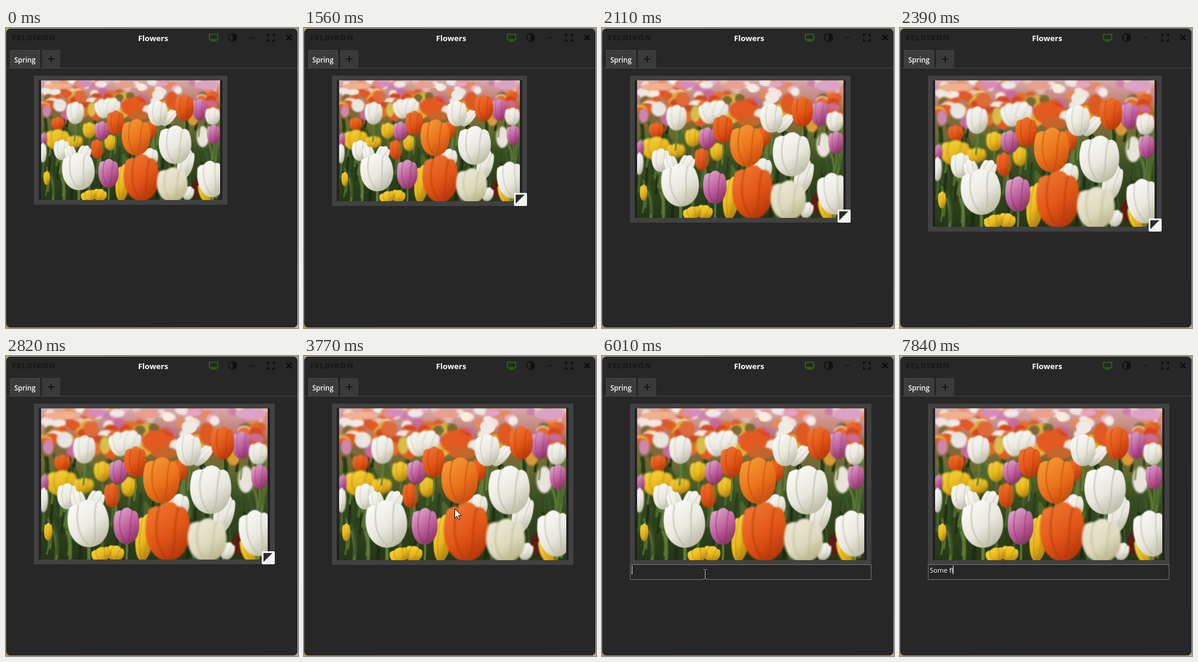
Recreate the animation shown at these times as an HTML page with a canvas. Size 491x504 px, loop 7.99 s.

```html
<!DOCTYPE html>
<html lang="en">
<head>
<meta charset="utf-8">
<title>Flowers</title>
<style>
html, body { margin: 0; width: 100%; height: 100%; overflow: hidden; background: #272727; }
canvas { display: block; }
</style>
</head>
<body>
<canvas id="stage" width="491" height="504"></canvas>
<script>
const LOOP = 7990;
const FONT = '"Open Sans", "Noto Sans", sans-serif';
const ctx = document.getElementById('stage').getContext('2d');

// Photo: painted once in a 382 x 255 space
const PW = 382, PH = 255;
const photo = paintPhoto();

function seeded(seed) {
  return () => (seed = (seed * 16807) % 2147483647) / 2147483647;
}

function paintPhoto() {
  const cv = document.createElement('canvas');
  cv.width = PW * 2;
  cv.height = PH * 2;
  const g = cv.getContext('2d');
  g.scale(2, 2);
  const rnd = seeded(41);
  const pick = list => list[Math.floor(rnd() * list.length)];

  const bg = g.createLinearGradient(0, 0, 0, PH);
  [[0, '#d9a9ab'], [.12, '#c58a80'], [.24, '#94683f'], [.4, '#666a30'], [.6, '#374d20'], [1, '#263617']]
    .forEach(([p, c]) => bg.addColorStop(p, c));
  g.fillStyle = bg;
  g.fillRect(0, 0, PW, PH);

  function blob(x, y, w, h, c) {
    g.fillStyle = c;
    g.beginPath();
    g.ellipse(x, y, w / 2, h / 2, 0, 0, 7);
    g.fill();
  }

  // leaves
  g.filter = 'blur(2px)';
  g.lineCap = 'round';
  for (let i = 0; i < 110; i++) {
    const x = rnd() * PW, y = 100 + rnd() * 160;
    g.strokeStyle = pick(['#1c2a13', '#38562a', '#4a672c', '#263f1a', '#5f7a3a']);
    g.lineWidth = 3 + rnd() * 4;
    g.beginPath();
    g.moveTo(x, y);
    g.quadraticCurveTo(x + 4, y - 25, x + rnd() * 24 - 12, y - 50);
    g.stroke();
  }

  // distant blooms, growing towards the viewer
  g.filter = 'blur(3px)';
  const far = ['#efe4e4', '#cf7fae', '#e8b3cc', '#e98a5c', '#f2ece6', '#d9573a', '#e7c0b8'];
  const near = ['#e25a22', '#d4471f', '#efe9e2', '#c96a9c', '#e46f2c', '#7a6a36', '#dcb23f'];
  for (let i = 0; i < 130; i++) {
    const y = i * .58 - 2, size = 12 + y / 6;
    blob(rnd() * PW, y, size * (1 + rnd() * .5), size, pick(y < 26 ? far : near));
  }
  [
    [36, 12, 60, 14, '#f3b08c'], [92, 8, 34, 13, '#d98abb'], [128, 8, 26, 14, '#f1e8ea'],
    [180, 10, 45, 13, '#e9a08d'], [258, 7, 26, 12, '#e5a5c4'], [355, 10, 50, 20, '#dba4c6'],
    [84, 34, 26, 26, '#df6a38'], [194, 56, 46, 38, '#e25a20'], [108, 62, 18, 30, '#d9bd48'],
    [40, 53, 28, 28, '#e9e5e2'], [12, 65, 18, 26, '#cf86ac'], [279, 43, 25, 38, '#de5a22'],
    [345, 120, 26, 45, '#e8e4da'], [210, 75, 40, 20, '#c4662c'], [324, 84, 22, 24, '#d99b36']
  ].forEach(a => blob(...a));
  g.filter = 'blur(1.5px)';
  blob(213, 14, 17, 16, '#fdebdb');
  blob(250, 31, 26, 22, '#f0eae4');

  const tones = {
    w: ['#fbfbf8', '#e9e8df', '#b6b69f'],
    c: ['#ece8d6', '#dfdbc0', '#b4b083'],
    o: ['#f0762f', '#e05516', '#b03409'],
    a: ['#f59a35', '#ea731c', '#c4480d'],
    p: ['#dda6cd', '#bd5c9a', '#83305f'],
    y: ['#f6d53e', '#e8b71c', '#a97a12']
  };

  function tulip(kind, x, y, w, h, tilt = 0, soft = .6) {
    const [light, mid, dark] = tones[kind];
    g.save();
    g.filter = `blur(${soft * 2}px)`;
    g.translate(x, y);
    g.strokeStyle = '#5f7d38';
    g.lineWidth = Math.max(2, w * .08);
    g.beginPath();
    g.moveTo(0, h * .42);
    g.quadraticCurveTo(2, h * .7, -2, h * 1.25);
    g.stroke();
    g.rotate(tilt);
    g.scale(w, h);
    const fill = g.createLinearGradient(-.3, -.45, .25, .5);
    fill.addColorStop(0, light);
    fill.addColorStop(.55, mid);
    fill.addColorStop(1, dark);
    g.fillStyle = fill;
    g.beginPath();
    g.moveTo(0, .5);
    g.bezierCurveTo(-.4, .5, -.62, .08, -.43, -.36);
    g.quadraticCurveTo(-.3, -.44, -.2, -.41);
    g.quadraticCurveTo(-.08, -.5, .04, -.5);
    g.quadraticCurveTo(.16, -.48, .23, -.4);
    g.quadraticCurveTo(.34, -.44, .42, -.34);
    g.bezierCurveTo(.62, .08, .4, .5, 0, .5);
    g.fill();
    g.globalAlpha = .5;
    g.strokeStyle = dark;
    g.lineWidth = .04;
    g.beginPath();
    g.moveTo(-.2, -.4);
    g.bezierCurveTo(-.34, 0, -.22, .3, -.04, .46);
    g.moveTo(.23, -.4);
    g.bezierCurveTo(.1, -.05, .2, .28, .04, .46);
    g.stroke();
    g.restore();
  }

  [
    ['o', 36, 92, 28, 28, 0, 1.4], ['y', 35, 126, 52, 44, 0, 1.6], ['y', 103, 106, 28, 34, 0, 1.4],
    ['y', 72, 130, 34, 26, 0, 1.6], ['o', 120, 146, 28, 42, 0, 1.4], ['y', 148, 132, 26, 34, 0, 1.6],
    ['w', 73, 69, 38, 48, 0, 1], ['w', 132, 60, 34, 42, -.3, 1.2], ['w', 150, 58, 36, 44, .3, 1.2],
    ['p', 130, 107, 32, 40, 0, .9], ['o', 235, 103, 24, 38, 0, 1.2], ['p', 338, 62, 32, 46, 0, 1],
    ['o', 306, 58, 40, 56, 0, .9], ['w', 366, 76, 32, 38, 0, 1.2], ['p', 368, 115, 28, 42, 0, .8],
    ['p', 6, 125, 14, 28, 0, 1.2], ['w', 4, 154, 16, 42, 0, 1]
  ].forEach(a => tulip(...a));
  [
    ['w', 273, 80, 20, 42, .7], ['w', 249, 70, 42, 54],
    ['o', 159, 90, 38, 52], ['w', 44, 148, 34, 44], ['w', 64, 158, 24, 40, -.3],
    ['w', 91, 158, 28, 42, .4], ['w', 308, 178, 34, 66, .25], ['w', 232, 164, 36, 40],
    ['a', 203, 121, 62, 78], ['w', 286, 137, 70, 82], ['y', 174, 218, 30, 80, .1],
    ['w', 80, 194, 70, 80, -.1], ['p', 144, 198, 44, 62], ['y', 125, 244, 30, 26, .3],
    ['y', 102, 246, 34, 24, -.3], ['y', 12, 208, 14, 30]
  ].forEach(a => tulip(...a));

  g.filter = 'blur(2px)';
  blob(335, 228, 26, 38, '#5a1d14');
  [
    ['y', 353, 238, 32, 48, -.3, 1], ['w', 363, 210, 58, 78, -.15, .8],
    ['w', 314, 240, 24, 30, .3, 1], ['o', 214, 207, 76, 100, 0, 1.4],
    ['c', 280, 222, 66, 74, 0, 1.6]
  ].forEach(a => tulip(...a));
  return cv;
}

// Drawing helpers
function box(x, y, w, h, fill, edge) {
  ctx.fillStyle = fill;
  ctx.fillRect(x, y, w, h);
  if (edge) {
    ctx.strokeStyle = edge;
    ctx.lineWidth = 1;
    ctx.strokeRect(x + .5, y + .5, w - 1, h - 1);
  }
}

function roundBox(x, y, w, h, r, fill) {
  ctx.fillStyle = fill;
  ctx.beginPath();
  ctx.roundRect(x, y, w, h, r);
  ctx.fill();
}

function text(s, x, y, size, color = '#fff', weight = 400, align = 'left') {
  ctx.font = `${weight} ${size}px ${FONT}`;
  ctx.textAlign = align;
  ctx.fillStyle = color;
  ctx.fillText(s, x, y);
}

function lines(color, width, ...paths) {
  ctx.strokeStyle = color;
  ctx.lineWidth = width;
  ctx.beginPath();
  for (const p of paths)
    for (let i = 0; i < p.length; i += 2) ctx[i ? 'lineTo' : 'moveTo'](p[i], p[i + 1]);
  ctx.stroke();
}

function shape(color, ...p) {
  ctx.fillStyle = color;
  ctx.beginPath();
  for (let i = 0; i < p.length; i += 2) ctx.lineTo(p[i], p[i + 1]);
  ctx.closePath();
  ctx.fill();
}

function disc(x, y, r, color, from = 0, to = 7) {
  ctx.fillStyle = color;
  ctx.beginPath();
  ctx.arc(x, y, r, from, to);
  ctx.fill();
}

// Linear interpolation through [time, ...values] keys
function track(keys, t) {
  if (t <= keys[0][0]) return keys[0].slice(1);
  for (let i = 1; i < keys.length; i++) {
    const a = keys[i - 1], b = keys[i];
    if (t < b[0]) {
      const k = (t - a[0]) / (b[0] - a[0]);
      return a.slice(1).map((v, j) => v + (b[j + 1] - v) * k);
    }
  }
  return keys[keys.length - 1].slice(1);
}

const between = (t, a, b) => t >= a && t < b;
const tick = t => 1900 + Math.floor((t - 1900) / 70) * 70;

// Window
function drawWindow(t) {
  const edge = ctx.createLinearGradient(0, 0, 491, 504);
  edge.addColorStop(0, '#b5aa86');
  edge.addColorStop(.5, '#a3966a');
  edge.addColorStop(1, t < 1560 ? '#d2b08a' : '#b9a876');
  ctx.fillStyle = edge;
  ctx.fillRect(0, 0, 491, 504);
  roundBox(0, 1, 490, 502, 7, '#4b4b48');
  roundBox(1, 1, 489, 502, 7, '#272727');

  ctx.letterSpacing = '1px';
  text('FELDIRON', 10, 21, 13, '#171a19', 800);
  ctx.letterSpacing = '0px';
  text('Flowers', 247.5, 21.5, 13.2, '#fff', 700, 'center');

  // title bar icons
  const green = '#2a5f0e';
  ctx.strokeStyle = green;
  ctx.lineWidth = 2;
  ctx.strokeRect(342, 10.5, 14, 9);
  box(347, 20, 4, 2, green);
  box(344, 21, 10, 2, green);
  ctx.strokeStyle = '#101010';
  ctx.lineWidth = 1.6;
  ctx.beginPath();
  ctx.arc(381, 16, 6.7, 0, 7);
  ctx.stroke();
  disc(381, 16, 6.5, '#101010', -Math.PI / 2, Math.PI / 2);
  lines('#171717', 1.5, [408, 16, 418, 16]);
  lines('#0c0c0c', 2, [440, 14.5, 440, 11, 443.5, 11], [447.5, 11, 451, 11, 451, 14.5],
    [451, 18.5, 451, 22, 447.5, 22], [443.5, 22, 440, 22, 440, 18.5]);
  lines('#0c0c0c', 2.4, [471.5, 11.5, 480.5, 20.5], [480.5, 11.5, 471.5, 20.5]);

  // tabs
  lines('#484848', 1, [1, 67.5, 490, 67.5]);
  box(7, 37, 50, 31, '#3c3c3c', '#4a4a4a');
  box(61, 37, 30, 30, '#3a3a3a', '#404040');
  text('Spring', 14, 58, 11.6, '#fff', 600);
  lines('#0d0d0d', 1.6, [70.5, 52, 81.5, 52], [76, 46.5, 76, 57.5]);
}

const WIDTHS = [[1490, 325], [1560, 329], [1900, 354], [2390, 393], [2810, 405], [2880, 406]];

function drawPhoto(t) {
  const w = Math.round(track(WIDTHS, tick(t))[0]), h = Math.round(w * 2 / 3);
  const right = 47 + w, bottom = 80 + h;
  box(47, 80, w, h, '#414141');
  box(55, 88, w - 16, h - 16, '#222');
  ctx.drawImage(photo, 59, 88, w - 24, h - 16);
  if (between(t, 1160, 3150)) {
    const x = right - 22, y = bottom - 22;
    ctx.globalAlpha = t < 1230 ? .5 : 1;
    roundBox(x, y, 22, 22, 2, '#f2f2f2');
    shape('#2b2b2b', x + 3, y + 3, x + 18, y + 3, x + 3, y + 18);
    ctx.globalAlpha = 1;
  }
}

function drawMenu() {
  box(249, 253, 157, 44, '#2b2d2f', '#3b3e40');
  box(249, 253, 157, 22, '#304650', '#2795c4');
  text('Add note', 284, 269, 11.5);
  text('Remove Note', 284, 291, 11.5);
}

const TYPED = [[6970, 'S'], [7220, 'Som'], [7370, 'Some'], [7690, 'Some '], [7840, 'Some fl']];

function drawNote(t) {
  const focus = t >= 5870;
  box(47, 350, 406, 26, '#262626', focus ? '#747474' : '#555');
  let s = '';
  for (const [at, v] of TYPED) if (t >= at) s = v;
  text(s, 50, 364, 11.3);
  if (focus && !between(t, 6440, 6900)) {
    const x = Math.round(50 + ctx.measureText(s).width);
    box(x, 352, 1, 15, '#f0f0f0');
  }
}

// Pointer
const PATH = [
  [260, 427, 467], [400, 414, 412], [610, 388, 337], [820, 372, 303], [960, 369, 299],
  [3150, 452, 374], [3290, 416, 347], [3500, 315, 288], [3710, 254, 256], [3770, 250, 254],
  [4440, 250, 254], [4650, 273, 264], [4840, 273, 264], [4980, 250, 316], [5190, 202, 396],
  [5260, 198, 397], [5470, 180, 376], [5680, 173, 366]
];

function arrow(x, y) {
  ctx.save();
  ctx.translate(Math.round(x) + .5, Math.round(y) + .5);
  shape('#fff', 0, 0, 0, 16, 3.7, 12.5, 6.3, 18, 8.7, 17, 6.2, 11.5, 11.2, 11.5);
  ctx.strokeStyle = '#000';
  ctx.lineWidth = 1;
  ctx.stroke();
  ctx.restore();
}

function iBeam(x, y) {
  const p = [[x - 3, y - 8, x - 1, y - 8, x, y - 7, x, y + 7, x - 1, y + 8, x - 3, y + 8],
    [x + 3, y - 8, x + 1, y - 8, x, y - 7], [x, y + 7, x + 1, y + 8, x + 3, y + 8]];
  lines('#000', 2.5, ...p);
  lines('#e6e6e6', 1, ...p);
}

function drawPointer(t) {
  if (!between(t, 260, 1160) && !between(t, 3150, 7050)) return;
  const [x, y] = track(PATH, tick(t));
  if (between(t, 3970, 4240) || between(t, 4700, 4840) || between(t, 5800, 5940))
    disc(x, y, 13, 'rgba(178,178,42,.85)');
  if (t > 5000 && y < 376) iBeam(Math.round(x) + .5, Math.round(y) + .5);
  else arrow(x, y);
}

function draw(t) {
  drawWindow(t);
  drawPhoto(t);
  if (between(t, 4100, 4840)) drawMenu();
  if (t >= 4910) drawNote(t);
  drawPointer(t);
}

const start = performance.now();
function frame() {
  draw((performance.now() - start) % LOOP);
  requestAnimationFrame(frame);
}
frame();
</script>
</body>
</html>
```
